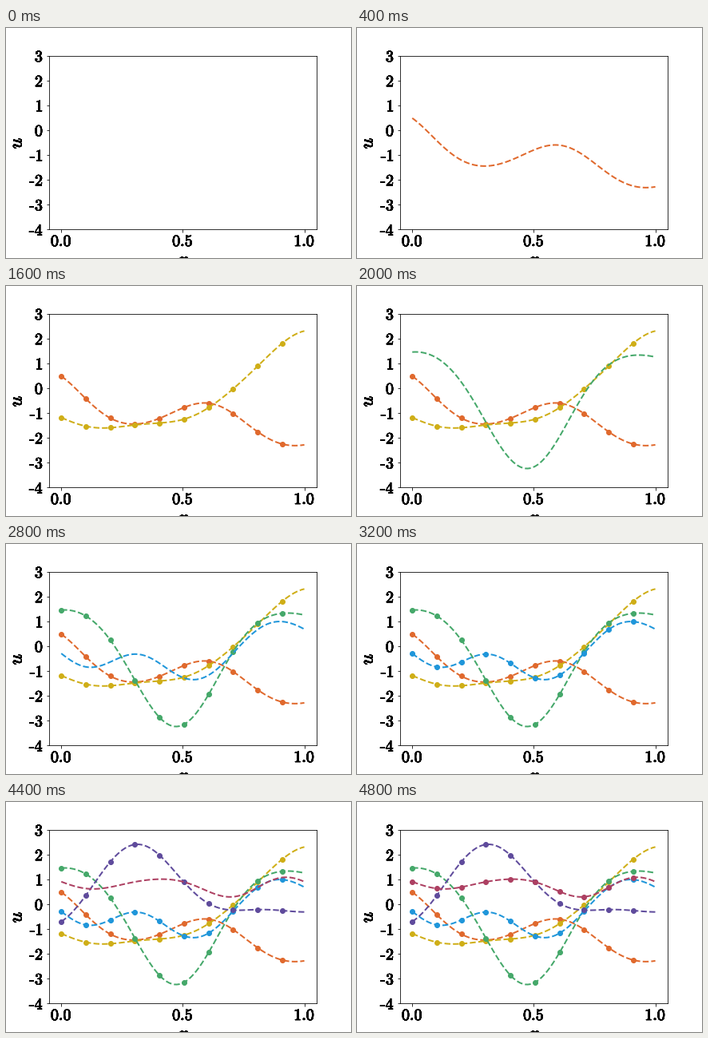
Write a matplotlib script that moves like this. It is 432 by 288 pixels and loops after 5.2 s.

```python
import numpy as np
import matplotlib.pyplot as plt
from matplotlib.animation import FuncAnimation
from matplotlib.patheffects import withStroke

plt.rcParams["mathtext.fontset"] = "cm"

WIDTH, HEIGHT = 432, 288
STEP_MS = 400
SCALE = 0.18  # correlation length of the smooth curves

# colour and a few evenly spaced key heights of each curve
CURVES = [
    ("#e0692d", [.48, -.81, -1.45, -1.12, -.61, -1.08, -2.06, -2.29]),
    ("#cfae17", [-1.19, -1.60, -1.51, -1.39, -.99, .03, 1.35, 2.30]),
    ("#45a86a", [1.45, .90, -1.08, -3.09, -2.49, -.12, 1.20, 1.25]),
    ("#1f96da", [-.30, -.84, -.34, -.86, -1.32, -.21, .92, .68]),
    ("#5f4b9c", [-.71, .93, 2.36, 1.73, .25, -.25, -.23, -.32]),
    ("#ad4062", [.90, .61, .86, 1.00, .65, .30, .92, .90]),
]

x = np.linspace(0, 1, 100)


def kernel(a, b):
    return np.exp(-(a[:, None] - b) ** 2 / (2 * SCALE ** 2))


def smooth(heights):
    """Gaussian-kernel interpolation through the key heights."""
    knots = np.linspace(0, 1, len(heights))
    mean = np.mean(heights)
    weights = np.linalg.solve(kernel(knots, knots), np.array(heights) - mean)
    return mean + kernel(x, knots) @ weights


def label(value):
    return rf"$\text{{{value}}}$"


fig = plt.figure(figsize=(WIDTH / 72, HEIGHT / 72), dpi=72, facecolor="white")
ax = fig.add_axes([0.125, 0.125, 0.775, 0.755])
ax.set(xlim=(-0.05, 1.05), ylim=(-4, 3))
xticks, yticks = [0.0, 0.5, 1.0], range(-4, 4)
ax.set_xticks(xticks, [label(t) for t in xticks])
ax.set_yticks(yticks, [label(t) for t in yticks])
ax.tick_params(labelsize=20)
ax.tick_params(axis="x", pad=2.5)

# repeated fills harden the glyph edges
heavy = [withStroke(linewidth=0.4, foreground="black")] * 6
for tick in ax.get_xticklabels() + ax.get_yticklabels():
    tick.set_path_effects(heavy)


def axis_name(name, px, py, rotation=0):
    fig.text(px / WIDTH, 1 - py / HEIGHT, name, size=24, rotation=rotation,
             rotation_mode="anchor", ha="center", va="baseline",
             path_effects=heavy)


axis_name("$u$", 19.7, 144, 90)
axis_name("$x$", 222.5, 297.5)

# each curve appears first, its sample dots one step later
layers = []
for color, heights in CURVES:
    y = smooth(heights)
    layers += ax.plot(x, y, "--", color=color, lw=2)
    layers += ax.plot(x[::10], y[::10], "o", color=color, ms=6)


def draw(step):
    for i, layer in enumerate(layers):
        layer.set_visible(i < step)
    return layers


anim = FuncAnimation(fig, draw, frames=len(layers) + 1, init_func=lambda: draw(0),
                     interval=STEP_MS, repeat=True, repeat_delay=0)
plt.show()
```
